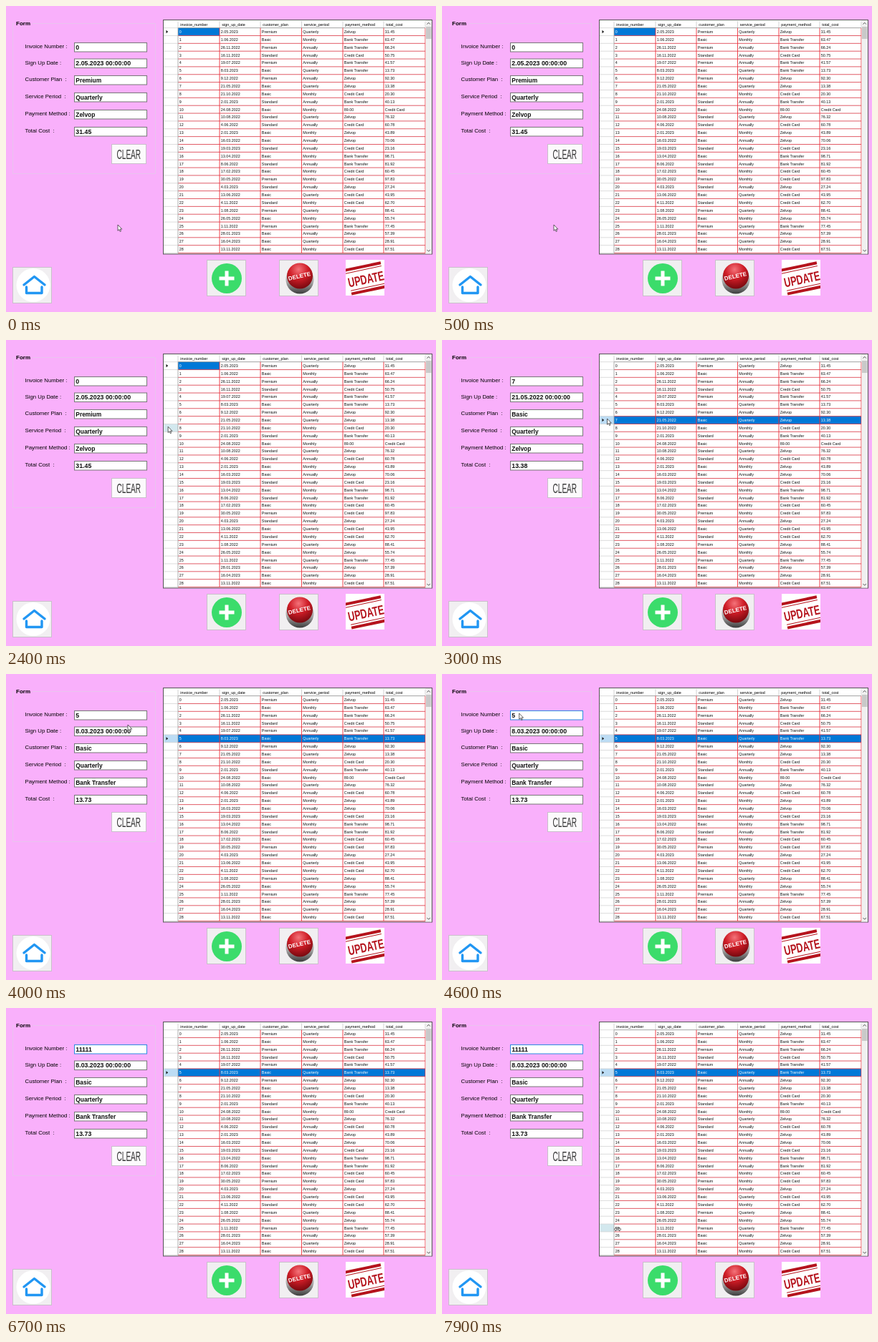
These frames come from a looping animation (600 px wide and 428 px high, 8 s). An HTML page:

```html
<!DOCTYPE html>
<html lang="en">
<head>
<meta charset="utf-8">
<title>Invoice form</title>
<style>
  html, body { margin: 0; width: 100%; height: 100%; overflow: hidden; background: #f9b0fb; }
  svg { display: block; width: 600px; height: 428px; }
  text { font-family: "Liberation Sans", Arial, sans-serif; white-space: pre; }
  .cell { font-size: 5.4px; }
  .label { font-size: 7.8px; }
  .bold { font-weight: bold; }
  .btn { fill: #f1eff1; stroke: #c9bfca; }
</style>
</head>
<body>
<svg viewBox="0 0 600 428">
  <defs>
    <radialGradient id="ball" cx=".45" cy=".25" r=".8">
      <stop offset="0" stop-color="#f4737a"/>
      <stop offset=".45" stop-color="#cf1d27"/>
      <stop offset="1" stop-color="#6d060c"/>
    </radialGradient>
    <linearGradient id="rim" x2="0" y2="1">
      <stop offset="0" stop-color="#e9e9e9"/>
      <stop offset=".6" stop-color="#a5a5a5"/>
      <stop offset="1" stop-color="#3c3c3c"/>
    </linearGradient>
    <clipPath id="stampBox"><rect x="474" y="355" width="54" height="50"/></clipPath>
  </defs>
  <rect width="600" height="428" fill="#f9b0fb"/>

  <path d="M12 24.5H9.5V234.5H208.500V24.5H37" fill="none" stroke="#e9c3ee"/>
  <text class="bold" x="14" y="27" font-size="8">Form</text>
  <g id="form"></g>
  <rect class="btn" x="147.5" y="193.500" width="48" height="27" style="fill:#fcfafc"/>
  <text transform="translate(154.5 214) scale(.56 1)" font-size="18" fill="#333">CLEAR</text>

  <g id="grid"></g>

  <g>
    <rect class="btn" x="9.500" y="365.500" width="54" height="50"/>
    <circle cx="38" cy="390.500" r="23.500" fill="#fff"/>
    <g fill="none" stroke="#2196f3" stroke-width="3.400" stroke-linejoin="round" stroke-linecap="round">
      <path d="M25 390L39.500 378.500L54 390"/>
      <path d="M28.500 393V401.500H50V393"/>
    </g>
  </g>
  <g>
    <rect class="btn" x="280.500" y="355.500" width="54" height="50"/>
    <circle cx="308" cy="381" r="21" fill="#3bdc6b"/>
    <path d="M308 370.500V391.500M297.500 381H318.500" stroke="#fff" stroke-width="5"/>
  </g>
  <g>
    <rect class="btn" x="381.500" y="355.500" width="54" height="50"/>
    <ellipse cx="410" cy="382.500" rx="19.500" ry="20" fill="url(#rim)"/>
    <circle cx="410" cy="377.500" r="18" fill="url(#ball)"/>
    <text class="bold" transform="translate(410 380.500) rotate(-13)" text-anchor="middle" font-size="8" fill="#fff">DELETE</text>
  </g>
  <g clip-path="url(#stampBox)">
    <rect x="474" y="355" width="54" height="50" fill="#fff"/>
    <g transform="translate(502 381) rotate(-12)" fill="#b5141d">
      <path d="M-26 -17H25M-24 17H27" stroke="#b5141d" stroke-width="4"/>
      <path d="M-26 -12.500H25M-24 12.500H27" stroke="#b5141d"/>
      <text class="bold" transform="scale(.68 1)" y="7.500" text-anchor="middle" font-size="18.500">UPDATE</text>
    </g>
  </g>

  <path id="arrow" d="M0 0V8.300L1.900 6.600L3.200 9.500L4.500 8.900L3.200 6.100H5.800Z" fill="#fff" stroke="#222" stroke-width=".7"/>
  <path id="sizer" d="M-5 0L-2.300 -2.500V-.8H2.300V-2.500L5 0L2.300 2.500V.8H-2.300V2.500Z" fill="#fff" stroke="#222" stroke-width=".7"/>
</svg>
<script>
const LOOP = 8000, STEP = 100;
const TOP = 30.6, ROW = 10.86;
const COLS = [240, 298, 355, 412.5, 470, 527, 585];
const HEADS = ['invoice_number', 'sign_up_date', 'customer_plan', 'service_period', 'payment_method', 'total_cost'];
const PLAN = { P: 'Premium', B: 'Basic', S: 'Standard' };
const PERIOD = { Q: 'Quarterly', M: 'Monthly', A: 'Annually' };
const METHOD = { Z: 'Zelvop', B: 'Bank Transfer', C: 'Credit Card' };

const rows = `2.05.2023 PQZ 31.45
1.06.2022 BMB 63.47
26.11.2022 PAB 66.24
16.11.2022 SAC 50.75
19.07.2022 PAB 41.57
8.03.2023 BQB 13.73
9.12.2022 PAZ 92.30
21.05.2022 BQZ 13.38
21.10.2022 BMC 20.30
2.01.2023 SAB 40.13
24.08.2022 BMC 89.00
10.08.2022 SQZ 76.32
4.06.2022 SAC 60.78
2.01.2023 BMZ 43.89
16.03.2022 BAZ 70.06
19.03.2023 SAC 23.16
13.04.2022 BMB 98.71
8.06.2022 SAB 81.92
17.02.2023 BMC 60.45
30.05.2022 PMC 97.83
4.03.2023 SAZ 27.24
13.06.2022 BQC 43.95
4.11.2022 SMC 62.70
1.08.2022 PQZ 88.41
26.05.2022 BMZ 55.74
1.11.2022 PQB 77.45
28.01.2023 BAZ 57.39
16.04.2023 BQZ 28.91
13.11.2022 BMC 67.51`.split('\n').map((line, i) => {
  const [date, [plan, period, method], cost] = line.split(' ');
  const row = [i, date, PLAN[plan], PERIOD[period], METHOD[method], cost];
  // This record was entered with its last two values swapped.
  if (i === 10) [row[4], row[5]] = [row[5], row[4]];
  return row;
});

const $ = id => document.getElementById(id);
const set = (el, attrs) => { for (const k in attrs) el.setAttribute(k, attrs[k]); };
const rect = (x, y, w, h, fill, extra = '') =>
  `<rect x="${x}" y="${y}" width="${w}" height="${h}" fill="${fill}" ${extra}/>`;
const text = (x, y, s, cls, extra = '') => `<text x="${x}" y="${y}" class="${cls}" ${extra}>${s}</text>`;
const path = (d, stroke, w = 1) => `<path d="${d}" fill="none" stroke="${stroke}" stroke-width="${w}"/>`;
const rowY = i => TOP + i * ROW;

// Form
const LABELS = ['Invoice Number :', 'Sign Up Date :', 'Customer Plan  :', 'Service Period  :', 'Payment Method :', 'Total Cost  :'];
const fieldY = [51.5, 74, 97.5, 121.5, 145.5, 169.5];
$('form').innerHTML = LABELS.map((label, i) => {
  const y = fieldY[i];
  return text(26.5, y + 7.5 + (i === 1 ? .5 : 0), label, 'label') +
    rect(95.5, y, 101, 12.5, '#fff', 'class="field" stroke="#777"') +
    (i ? '' : rect(97, y + 1.5, 6, 10, '#0078d7', 'id="mark"')) +
    text(97.3, y + 9.4, '', 'bold value');
}).join('');
const fields = [...document.querySelectorAll('.field')];
const values = [...document.querySelectorAll('.value')];

// Table
const bottom = rowY(rows.length);
let html = rect(219.5, 19.5, 375, 327.5, '#fff', 'stroke="#555"') +
  rect(220.5, 0, 19.5, ROW, '#d3e8ee', 'id="hover"') +
  rect(220.5, 0, 19.5, ROW, '#bcdcf4', 'id="rowHead"') +
  rect(240, 0, 58, ROW, '#0078d7', 'id="pick"');
for (let i = 0; i <= rows.length; i++) {
  html += path(`M220 ${rowY(i)}H240`, '#d5d5d5', .8) + path(`M240 ${rowY(i)}H585`, i ? '#d8323f' : '#8c8c8c', .8);
}
COLS.forEach((x, i) => {
  html += path(`M${x} 21V${TOP}`, '#c8c8c8', .8) + path(`M${x} ${TOP}V${bottom}`, i ? '#ee2e38' : '#a5a5a5', .9);
});
html += HEADS.map((h, i) => text(COLS[i] + 3.3, 27.6, h, 'cell')).join('');
html += rows.map((row, r) =>
  row.map((v, c) => text(COLS[c] + 1.8, rowY(r) + 7.4, v, 'cell', `data-row="${r}"`)).join('')).join('');
html += '<path id="pointer" d="M0 -2.200L2.600 0L0 2.200Z" fill="#111"/>' +
  rect(585.5, 20, 8.500, 326.500, '#f0f0f0') + rect(586, 29, 7.500, 17, '#c9c9c9') +
  path('M587.500 25.500L589.700 23.300L591.900 25.500M587.500 341L589.700 343.200L591.900 341', '#555', 1);
$('grid').innerHTML = html;
const cells = [...document.querySelectorAll('[data-row]')];

// Pointer track: time, x, y
const track = [
  [0, 156, 306], [1000, 156, 306], [1500, 156.5, 304], [1800, 160, 296], [2500, 230, 111],
  [3000, 230.5, 110], [3300, 230, 88], [3500, 230, 88], [4000, 170, 71], [4500, 108, 55],
  [4900, 106, 55], [5300, 78, 54], [6800, 78, 54], [7200, 110, 120], [7800, 236, 300], [8000, 240, 309]
];
function pointerAt(t) {
  const i = Math.max(1, track.findIndex(k => k[0] > t));
  const [t0, x0, y0] = track[i - 1], [t1, x1, y1] = track[i];
  const p = (t - t0) / (t1 - t0), e = p * p * (3 - 2 * p);
  return [x0 + (x1 - x0) * e, y0 + (y1 - y0) * e];
}

function draw(t) {
  const [x, y] = pointerAt(t);
  const sel = t < 2600 ? 0 : t < 3400 ? 7 : 5;
  const full = sel > 0;
  const typed = t < 5900 ? 0 : Math.min(5, 1 + Math.floor((t - 5900) / 160));
  const marked = t >= 5100 && !typed;
  const focus = t >= 4600;

  set($('pick'), { y: rowY(sel), width: full ? 345 : 58 });
  set($('rowHead'), { y: rowY(sel), opacity: +full });
  set($('pointer'), { transform: `translate(223.500 ${rowY(sel) + ROW / 2})` });
  cells.forEach((c, i) => set(c, { fill: +c.dataset.row === sel && (full || i === 0) ? '#fff' : '#111' }));

  const over = Math.floor((y - TOP) / ROW);
  set($('hover'), { y: rowY(over), opacity: +(x > 220 && x < 242 && over >= 0 && over < rows.length) });

  const shown = [...rows[sel]];
  shown[1] += ' 00:00:00';
  if (typed) shown[0] = '1'.repeat(typed);
  values.forEach((v, i) => {
    v.textContent = shown[i];
    set(v, { 'font-size': /^\d/.test(shown[i]) ? 8.8 : 8.4, fill: !i && marked ? '#fff' : '#111' });
  });
  set($('mark'), { opacity: +marked });
  fields.forEach((f, i) => {
    const inside = x > 95 && x < 197 && y + 3 > fieldY[i] && y < fieldY[i] + 12.5;
    set(f, { stroke: !i && focus ? '#2b8be0' : inside ? '#222' : '#777' });
  });

  const hidden = t >= 5900 && t < 6800, sizing = t >= 7900;
  set($('arrow'), { transform: `translate(${x} ${y})`, opacity: +!(hidden || sizing) });
  set($('sizer'), { transform: 'translate(245 309.500)', opacity: +sizing });
}

const start = performance.now();
function tick() {
  const t = (performance.now() - start) % LOOP;
  draw(Math.floor(t / STEP) * STEP);
  requestAnimationFrame(tick);
}
tick();
</script>
</body>
</html>
```
